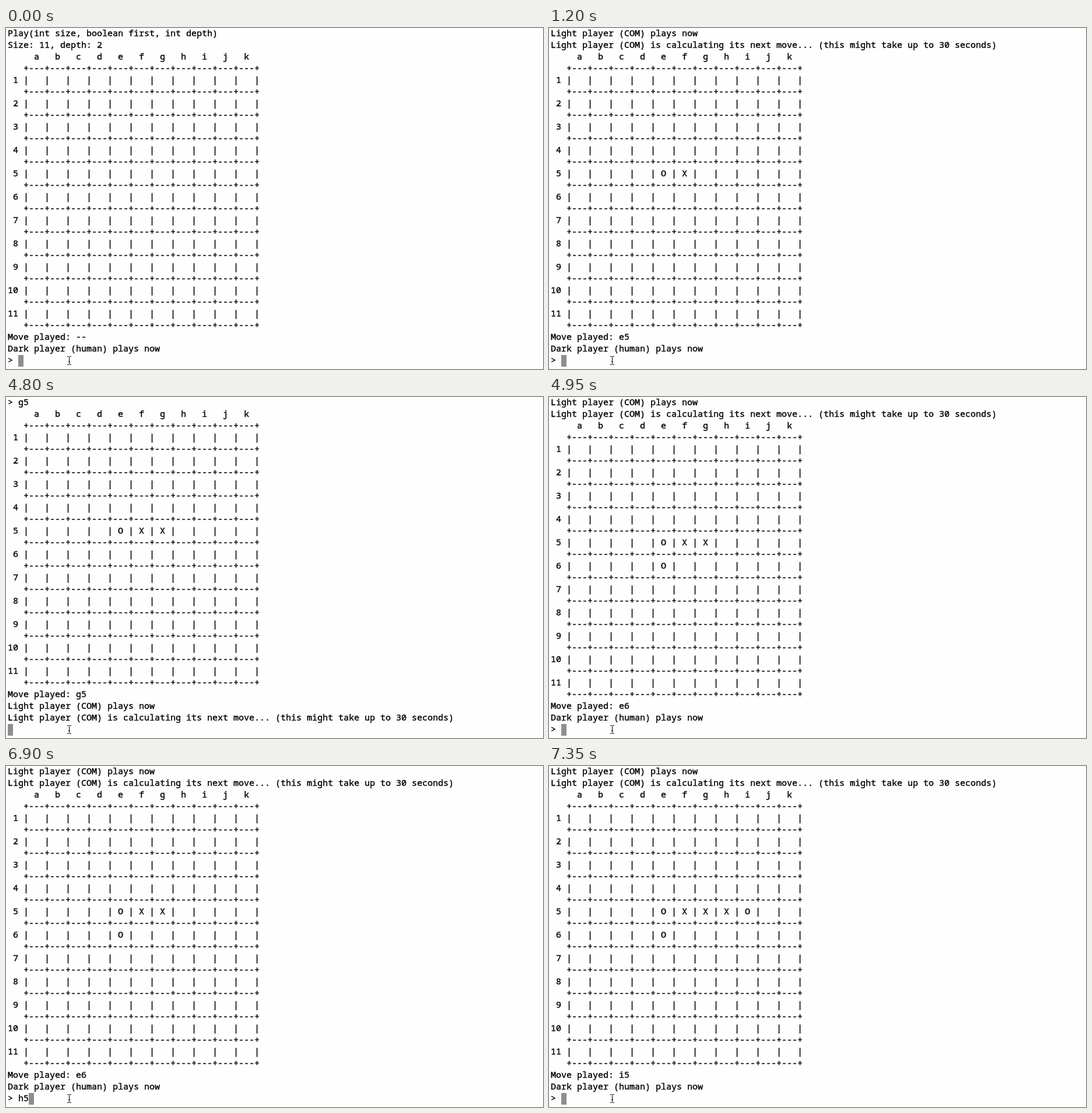
An HTML page for the animation above (8000 ms loop, 921x584 px).

```html
<!DOCTYPE html>
<html lang="en">
<head>
<meta charset="utf-8">
<title>Board game in a terminal</title>
<style>
  html, body { margin: 0; width: 100%; height: 100%; overflow: hidden; background: #fefefe; }
  #stage { position: relative; width: 921px; height: 584px; overflow: hidden; }
  #screen {
    position: absolute; left: 3px; top: -2px; margin: 0; color: #000;
    font: 500 15px/20px "Noto Sans Mono", "DejaVu Sans Mono", monospace;
    font-variant-ligatures: none;
    -webkit-text-stroke: 0.4px #000;
  }
  #caret { position: absolute; top: 560px; width: 9px; height: 20px; background: #8e8e8e; }
  #pointer { position: absolute; left: 103px; top: 560px; }
</style>
</head>
<body>
<div id="stage">
  <div id="caret"></div>
  <pre id="screen"></pre>
  <svg id="pointer" width="12" height="20" fill="none" stroke="#000">
    <path d="M2 2.5H4.5L5.5 3.5L6.5 2.5H9M5.5 3V16M2 16.5H4.5L5.5 15.5L6.5 16.5H9M4 11.5H7"/>
  </svg>
</div>
<script>
const LOOP = 8000, SIZE = 11;
const COLUMNS = [..."abcdefghijk"];
const LIGHT_TURN = "Light player (COM) plays now";
const THINKING = "Light player (COM) is calculating its next move... (this might take up to 30 seconds)";
const INTRO = ["Play(int size, boolean first, int depth)", "Size: 11, depth: 2"];

// Dark (X) and light (O) alternate
const MOVES = ["f5", "e5", "g5", "e6", "h5", "i5"];

// [start time, moves on the board, typed input]
const STEPS = [
  [0, 0, ""], [750, 0, "f"], [900, 0, "f5"],
  [1200, 2, ""], [4350, 2, "g"], [4650, 2, "g5"], [4800, 3, ""],
  [4950, 4, ""], [6600, 4, "h"], [6900, 4, "h5"], [7050, 5, ""],
  [7350, 6, ""]
];

function board(count) {
  const rule = "   +" + "---+".repeat(SIZE);
  const lines = ["     " + COLUMNS.join("   "), rule];
  for (let row = 1; row <= SIZE; row++) {
    const cells = COLUMNS.map(col => {
      const i = MOVES.slice(0, count).indexOf(col + row);
      return ` ${i < 0 ? " " : "XO"[i % 2]} |`;
    });
    lines.push(String(row).padStart(2) + " |" + cells.join(""), rule);
  }
  return lines;
}

function terminal(count, input) {
  const last = MOVES[count - 1] || "--";
  const played = [...board(count), "Move played: " + last];
  if (count % 2) return ["> " + last, ...played, LIGHT_TURN, THINKING, ""];
  const top = count ? [LIGHT_TURN, THINKING] : INTRO;
  return [...top, ...played, "Dark player (human) plays now", "> " + input];
}

const screenEl = document.getElementById("screen");
const caret = document.getElementById("caret");
let shown;

function draw(now) {
  const time = now % LOOP;
  const step = STEPS.findLast(([start]) => start <= time);
  if (step !== shown) {
    shown = step;
    const lines = terminal(step[1], step[2]);
    screenEl.textContent = lines.join("\n");
    caret.style.left = 3 + 9 * lines.at(-1).length + "px";
  }
}

const begin = performance.now();
function tick() {
  draw(performance.now() - begin);
  requestAnimationFrame(tick);
}
tick();
</script>
</body>
</html>
```
